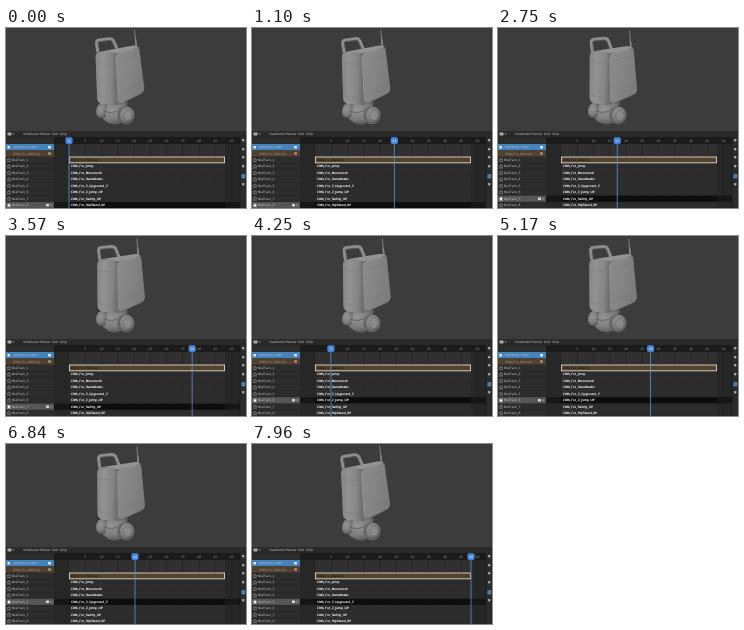
An HTML page that plays this animation: 240 px wide and 180 px high, repeating every 8 s.

```html
<!DOCTYPE html>
<html lang="en">
<head>
<meta charset="utf-8">
<title>Robot track editor</title>
<style>
html, body { margin: 0; width: 100%; height: 100%; overflow: hidden; background: #3c3c3c; }
svg { display: block; width: 100vw; height: 100vh; }
text { font-family: "DejaVu Sans", Inter, sans-serif; font-size: 3.05px; fill: #c4c4c4; }
.clip { fill: #fff; stroke: #fff; stroke-width: .12px; }
.mute { fill: #999; }
.dark { fill: #19140d; }
.tan { fill: #a8977f; }
</style>
</head>
<body>
<svg viewBox="0 0 240 180" preserveAspectRatio="none">
  <defs>
    <linearGradient id="front" x2="1" y2="0.1">
      <stop offset="0" stop-color="#858585"/><stop offset=".35" stop-color="#929292"/><stop offset=".75" stop-color="#858585"/><stop offset="1" stop-color="#6c6c6c"/>
    </linearGradient>
    <linearGradient id="side" x2="1" y2="0.4">
      <stop offset="0" stop-color="#8b8b8b"/><stop offset=".5" stop-color="#858585"/><stop offset="1" stop-color="#7c7c7c"/>
    </linearGradient>
    <radialGradient id="ball" cx=".4" cy=".35" r=".7">
      <stop offset="0" stop-color="#959595"/><stop offset=".6" stop-color="#7d7d7d"/><stop offset="1" stop-color="#555"/>
    </radialGradient>
  </defs>
  <rect width="240" height="180" fill="#3c3c3c"/>

  <g id="base">
    <path d="M94 74H122L118 91Q114 98 106 96Q97 94 95 86Z" fill="url(#ball)"/>
    <path d="M93 76Q89 80 90.5 87Q93 91 99 89L101 76Z" fill="url(#ball)"/>
    <path d="M98 83Q108 87 115 80" fill="none" stroke="#5b5b5b" stroke-width=".8"/>
    <ellipse cx="120" cy="87.3" rx="8.6" ry="9" fill="#646464"/>
    <ellipse cx="121" cy="87.3" rx="7.3" ry="8.2" fill="url(#ball)"/>
    <ellipse cx="121.8" cy="87.3" rx="4.2" ry="5" fill="#8a8a8a" stroke="#686868" stroke-width=".6"/>
  </g>
  <g id="body">
    <path d="M130.8 2.5L131.6 2.5L133.4 21L131.7 21Z" fill="#7d7d7d"/>
    <path d="M131.5 12L132.6 12L133.5 21L131.8 21Z" fill="#8a8a8a"/>
    <path d="M94 24L92.8 14.5Q92.7 11.8 95.5 11.4L105.5 10.4Q108.8 10.2 110 12.8L114 23" fill="none" stroke="#8c8c8c" stroke-width="3" stroke-linejoin="round"/>
    <path d="M95.6 21L94.6 15Q94.5 13.4 96 13.2L105.7 12.2Q107.8 12 108.6 14L111.8 22" fill="none" stroke="#5c5c5c" stroke-width=".8"/>
    <path d="M91.5 28Q91.8 23.5 96 23L112 22L130 18Q134.6 17.6 135.5 21.5L139 60Q139.3 65 135 67L114 76.5L97 75.5Q92 74.5 91.6 70Z" fill="#6d6d6d"/>
    <path d="M91.5 28Q92 23.6 96 23.4L108 24.2Q111.2 25 111.4 29L112.5 77L97 75.6Q92 74.5 91.6 70Z" fill="url(#front)"/>
    <path d="M97 22.9L128 18.2Q132.5 17.8 134.2 20L113 25.2Z" fill="#949494"/>
    <path d="M111.8 30Q111.8 26.5 115 25.5L130.5 20.7Q134.7 19.7 135.2 23.6L138.6 60.5Q139 64.5 135 66.3L117 74.3Q113 75.8 112.8 71Z" fill="url(#side)"/>
    <path d="M112.5 74L111.8 30.5Q111.8 26.6 115 25.7L130.5 20.9" fill="none" stroke="#9c9c9c" stroke-width=".6"/>
    <path d="M116 33L132 28M116.5 65L135 57" stroke="#777" stroke-width=".5"/>
    <path d="M92.3 34Q101 36 110 36M92.3 67Q102 70 111.5 70" fill="none" stroke="#7b7b7b" stroke-width=".5"/>
  </g>

  <g id="editor"></g>
  <g id="active">
    <rect y="-3.1" width="48" height="6.2" fill="#565656"/>
    <rect x="48" y="-3.1" width="186" height="6.2" fill="#161616"/>
    <rect x="63" y="-2.9" width="156" height="5.8" fill="#0e0d0d"/>
    <path d="M40 -1.2H43V1.2H40Z" fill="#d8d8d8"/><path d="M45 -1V1" stroke="#aaa" stroke-width="1"/>
  </g>
  <g id="labels"></g>
  <g id="head">
    <rect x="-.4" y="115" width=".8" height="65" fill="#5f92d2"/>
    <rect x="-3.6" y="109.3" width="7.2" height="6.8" rx="1.8" fill="#4b86d6"/>
    <text id="count" y="113.8" text-anchor="middle" style="fill:#fff"></text>
  </g>
</svg>
<script>
const $ = id => document.getElementById(id);
const NS = "http://www.w3.org/2000/svg";

function add(parent, tag, attrs, text) {
  const el = document.createElementNS(NS, tag);
  for (const k in attrs) el.setAttribute(k, attrs[k]);
  if (text !== undefined) el.textContent = text;
  parent.appendChild(el);
  return el;
}
const box = (x, y, width, height, fill, more) =>
  add($("editor"), "rect", { x, y, width, height, fill, ...more });
const label = (x, y, text, more) => add($("labels"), "text", { x, y, ...more }, text);

const LOOP = 8000, SPAN = 49;
const frameX = f => 63 + 3.25 * f;
const rowY = i => 132 + 6.45 * i;

const clips = ["Walking", "Jump", "Movement", "Handshake", "Z_Upground_2",
  "Z_Jump_UP", "Safety_UP", "HipStand_UP"];
const stars = [];

function build() {
  box(0, 103, 240, 77, "#222");
  box(0, 103, 240, 6, "#292929");
  box(0, 109, 240, 7, "#1b1b1b");
  box(48, 116, 186, 64, "#272727");
  box(frameX(0), 116, 156, 64, "#303030");
  for (let f = 0; f <= 50; f += 5) {
    box(frameX(f) - .3, 116, .6, 64, "#212121");
    if (f) label(frameX(f), 113.8, f, { "text-anchor": "middle", class: "mute" });
  }
  box(0, 109, 48, 71, "#2c2c2c");
  box(0, 116, 48, 6.3, "#4583bd");
  box(0, 122.3, 48, 6.3, "#50402f");
  label(7, 120.2, "armature_robot");
  label(7, 126.6, "CMA_For_Walking", { class: "tan" });
  box(1.5, 118, 2.5, 2.5, "#d5e5f4");
  box(42, 118, 3, 2.4, "#d5e5f4");
  box(42, 124.3, 3, 2.4, "#a58d72");

  clips.forEach((name, i) => {
    const y = rowY(i);
    box(0, y + 3, 48, .4, "#202020");
    if (i) box(frameX(0), y - 2.8, 156, 5.6, "#2c2c2c");
    label(6, y + 1, "NlaTrack_" + (i + 1));
    label(65, y + 1, "CMA_For_" + name, { class: i ? "clip" : "dark" });
    stars.push(add($("labels"), "path", {
      d: "M0-2L.6-.6 2-.5.9.5 1.3 2 0 1.2-1.3 2-.9.5-2-.5-.6-.6Z",
      transform: `translate(3 ${y})`, stroke: "#bbb", "stroke-width": .4
    }));
  });
  box(frameX(0) + .5, 129, 155, 5.8, "#51412f", { stroke: "#ddd5c9", "stroke-width": .9 });

  box(1.5, 104.5, 4, 3, "#aaa");
  [[7, "▾"], [17, "View"], [24, "Select"], [34, "Marker"], [46, "Edit"], [54, "Strip"]]
    .forEach(([x, s]) => label(x, 107.2, s));
  box(234, 109, 6, 71, "#2b2b2b");
  box(233.7, 109, .6, 71, "#181818");
  [112, 121, 129, 138, 156].forEach(y => box(236, y - 1, 2.4, 2.4, "#aaa", { rx: .8 }));
  box(235.3, 146, 4, 4.5, "#5579a5", { rx: 1 });
}

// Screen refreshes come in runs of nine, with a short uneven pause between runs.
const runs = [80, 900, 1750, 2570, 3390, 4250, 5070, 5910, 6740, 7580];
function stepAt(t) {
  let step = 0;
  runs.forEach((start, i) => {
    if (t >= start) step = 1 + 9 * i + Math.min(8, Math.floor((t - start + 6) / 92.5));
  });
  return step;
}

// step, frames played, lean in degrees
const keys = [[1, 0, -2], [12, 24.4, -1.8], [30, 66.3, .3], [46, 102.9, -.6],
  [64, 143.7, 0], [74, 167.3, -.2], [86, 195, -2.6]];
function sample(step) {
  const i = Math.max(1, keys.findIndex(k => k[0] >= step));
  const a = keys[i - 1], b = keys[i], u = Math.max(0, (step - a[0]) / (b[0] - a[0]));
  return [1, 2].map(n => a[n] + (b[n] - a[n]) * u);
}

function draw(t) {
  const [played, lean] = sample(stepAt(t));
  const frame = played % SPAN;
  const row = 7 - Math.floor(played / SPAN);
  $("body").setAttribute("transform", `rotate(${lean} 112 82)`);
  $("base").setAttribute("transform", `rotate(${lean * .4} 112 82)`);
  $("active").setAttribute("transform", `translate(0 ${rowY(row)})`);
  stars.forEach((s, i) => s.setAttribute("fill", i === row ? "#fff" : "none"));
  $("head").setAttribute("transform", `translate(${frameX(frame)} 0)`);
  $("count").textContent = Math.round(frame);
}

build();
const begin = performance.now();
function tick() {
  draw((performance.now() - begin) % LOOP);
  requestAnimationFrame(tick);
}
tick();
</script>
</body>
</html>
```
